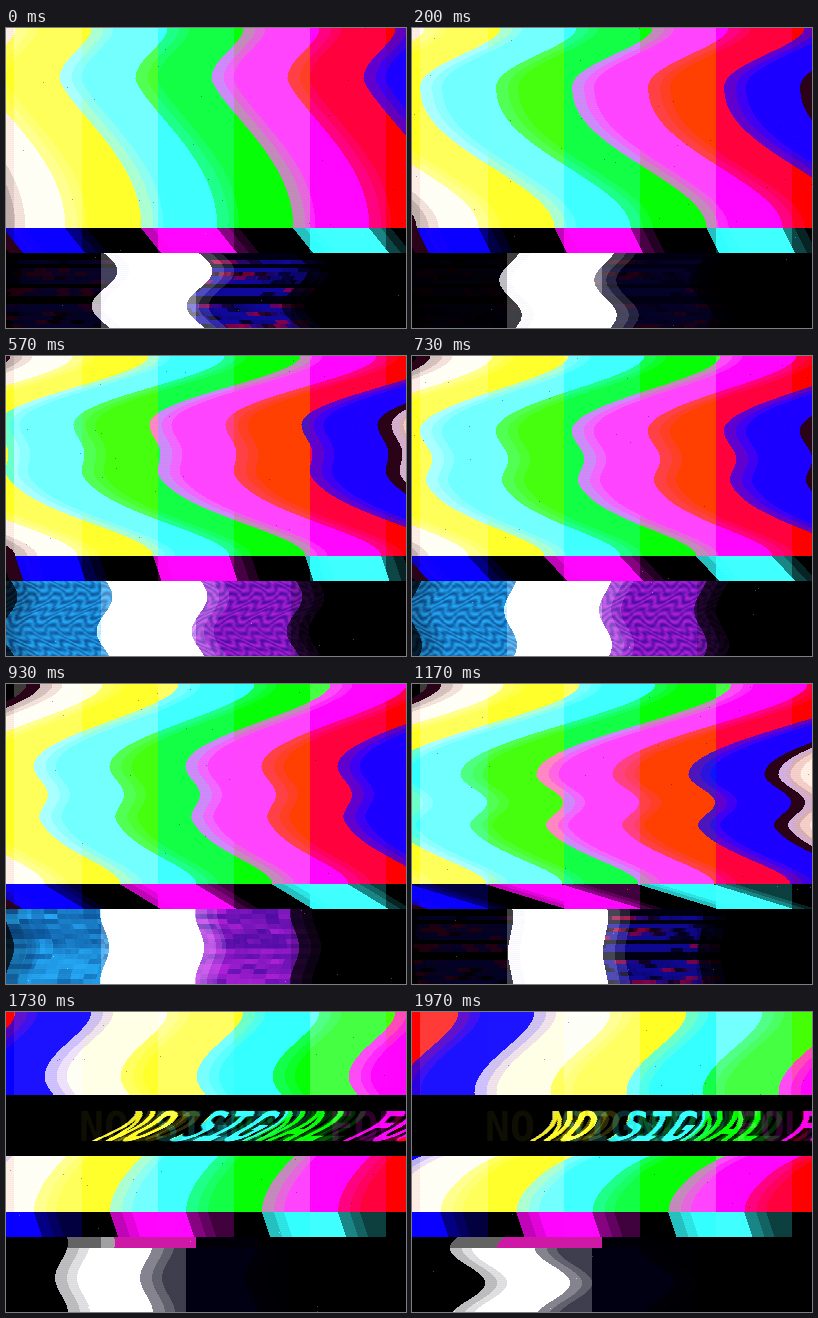
Write an HTML page with a canvas that moves like this. It is 400x300 px and loops after 2.01 s.

```html
<!DOCTYPE html>
<html lang="en">
<head>
<meta charset="utf-8">
<title>Test card</title>
<style>
  html, body { margin: 0; width: 100%; height: 100%; overflow: hidden; background: #000; }
  canvas { display: block; width: 100vw; height: 100vh; }
</style>
</head>
<body>
<canvas id="screen" width="400" height="300"></canvas>
<script>
const W = 400, H = 300, WRAP = 532, LOOP = 2010, STEPS = 60;
const CARD_ON = 40;
const ctx = document.getElementById('screen').getContext('2d');
const image = ctx.createImageData(W, H);
const px = image.data;

const BLACK = [0, 0, 0], DARK = [42, 3, 25], NAVY = [1, 0, 14], WHITE = [250, 250, 252],
  CREAM = [244, 231, 221], YELLOW = [255, 248, 35], CYAN = [50, 255, 255], GREEN = [5, 255, 5],
  MAGENTA = [255, 5, 245], RED = [255, 0, 0], BLUE = [8, 0, 250];
const BARS = [CREAM, YELLOW, CYAN, GREEN, MAGENTA, RED, BLUE];
const LOWER = [BLUE, BLACK, MAGENTA, BLACK, CYAN, BLACK, BLACK];

// The bend of the picture: shift at the top, furthest shift and its height,
// shift at the base, and the size of the kink below the furthest point.
const BENDS = [
  { at: 0, top: -67, peak: -99, y: 50, base: -17, kink: 0 },
  { at: 11, top: -62, peak: -182, y: 65, base: -4, kink: 0 },
  { at: 17, top: -10, peak: -161, y: 68, base: -5, kink: 10 },
  { at: 28, top: 20, peak: -125, y: 82, base: -38, kink: 14 },
  { at: 35, top: 15, peak: -180, y: 90, base: -78, kink: 26 },
  { at: 44, top: 42, peak: 11, y: 47, base: -49, kink: 42 },
  { at: 59, top: 122, peak: 62, y: 80, base: -48, kink: 20 }
];

const lerp = (a, b, p) => a + (b - a) * p;
const ease = p => (1 - Math.cos(Math.PI * p)) / 2;
const hash = (a, b, c) => {
  const v = Math.sin(a * 12.99 + b * 78.23 + c * 37.72) * 43758.55;
  return v - Math.floor(v);
};

let step = -1, card = false, lit = false, streak = 0;

function bendAt(s) {
  let k = 0;
  while (k < BENDS.length - 2 && BENDS[k + 1].at <= s) k++;
  const a = BENDS[k], b = BENDS[k + 1], p = (s - a.at) / (b.at - a.at);
  const bend = {};
  for (const key in a) bend[key] = lerp(a[key], b[key], p);
  return bend;
}

function shiftAt(bend, y) {
  const foot = card ? -40 : 3;
  if (y >= 225) {
    const sway = card ? (step - 48) * 1.6 : 13 - 0.3 * step;
    return foot + sway * Math.sin((y - 225 + 4.27 * step) * Math.PI / 35);
  }
  if (y >= 200) return lerp(bend.base, foot, (y - 200) / 25);
  if (y < bend.y) return lerp(bend.top, bend.peak, ease((y / bend.y) ** 0.9));
  const below = y - bend.y;
  const skew = card ? 1 : Math.min(2.2, 0.7 + 0.075 * step);
  const span = card ? 80 : 55;
  const kink = below < span ? bend.kink * ease(2 * below / span) : 0;
  return lerp(bend.peak, bend.base, ease((below / (200 - bend.y)) ** skew)) + kink;
}

function textMask() {
  const c = document.createElement('canvas');
  c.width = WRAP;
  c.height = H;
  const g = c.getContext('2d');
  g.font = 'bold 41.5px "DejaVu Sans Mono", monospace';
  g.fillText('NO SIGNAL FOUND', 73, 129);
  const data = g.getImageData(0, 0, WRAP, H).data;
  return (u, y) => data[(y * WRAP + u) * 4 + 3] / 255;
}
const mask = textMask();

// Blue and purple blocks: wavy lines first, torn cells later.
function texture(u, y, left) {
  let n = Math.sin(y * 0.8 + 4 * Math.sin(u * 0.25 + 2 * Math.sin(y * 0.1))) / 2 + 0.5;
  if (step >= 23) n = hash(Math.floor(u / 13), Math.floor(y / 5), step) ** (y < 264 ? 1.3 : 0.6);
  return left ? [10 + 20 * n, 65 + 70 * n, 120 + 75 * n] : [55 + 85 * n, 8 + 18 * n, 125 + 45 * n];
}

function streaks(u, y, left) {
  const row = Math.floor(y / 4);
  const h = hash(Math.floor((u + row * 7) / 12), row, 3);
  const k = streak * (left ? 0.25 : 1);
  if (hash(row, 1, 5) < 0.35 || h < 0.2) return left ? BLACK : NAVY;
  return h > 0.8 ? [150 * k, 0, 60 * k] : [15 * k, 8 * k, 150 * k];
}

function footer(u, y) {
  if (u >= 95 && u < (card ? 180 : 190)) return WHITE;
  if (u < 0 || u >= 285) return BLACK;
  const left = u < 95;
  if (lit) return texture(u, y, left);
  if (streak > 0) return streaks(u, y, left);
  return left ? BLACK : NAVY;
}

function sample(u, y, still) {
  if (y >= 225) return footer(u, y);
  if (still && u < 8) return BLACK;
  if (!still && !card) {
    if (u < 0) return BLACK;
    if (u % WRAP < 14) return DARK;
  }
  const bar = Math.floor(((u + WRAP) % WRAP) / 76);
  return (y < 200 ? BARS : LOWER)[bar];
}

const sum = [0, 0, 0];
function add(u, y, weight, still) {
  if (card && y >= 83 && y < 144) {
    weight *= mask((u + WRAP) % WRAP, y) * (still ? 0.7 : 1.25);
    if (!weight) return;
  }
  const c = sample(u, y, still);
  for (let i = 0; i < 3; i++) sum[i] += c[i] * weight;
}

function put(x, y, r, g, b) {
  const o = (y * W + x) * 4;
  px[o] = r;
  px[o + 1] = g;
  px[o + 2] = b;
  px[o + 3] = 255;
}

function draw() {
  card = step >= CARD_ON;
  lit = step >= 14 && step < 32;
  streak = step < 8 ? 0.8 * (1 - step / 8) : step >= 32 ? Math.max(0, 1 - (step - 32) / 12) : 0;
  const bend = bendAt(step);
  for (let y = 0; y < H; y++) {
    const d = shiftAt(bend, y);
    const tail = card && y >= 225 && y < 236;
    const line = y % 2 ? 0.98 : 1;
    for (let x = 0; x < W; x++) {
      const u = Math.floor(x - d);
      if (tail && u >= 142 && x < 190) {
        put(x, y, 205, 25, 165);
        continue;
      }
      const c = sample(u, y);
      if (c === DARK) {
        put(x, y, ...DARK);
        continue;
      }
      sum.fill(0);
      add(u, y, tail ? 0.4 : 0.76);
      if (!tail) {
        add(u - 12, y, 0.14);
        add(u - 22, y, 0.14);
      }
      const faint = y < 200 && (c === BLUE || c === CREAM);
      add(x, y, faint ? 0.08 : 0.25, true);
      put(x, y, sum[0] * line, sum[1] * line, sum[2] * line);
    }
  }
  // Sparse tape specks.
  for (let i = 0; i < 36; i++) {
    const x = Math.floor(hash(i, step, 1) * W), y = Math.floor(hash(i, step, 2) * H);
    const o = (y * W + x) * 4;
    for (let c = o; c < o + 3; c++) px[c] = y < 200 ? px[c] * 0.65 : px[c] + 70;
  }
  ctx.putImageData(image, 0, 0);
}

// Steps are a thirtieth of a second, rounded to 10 ms.
function stepAt(t) {
  let i = Math.min(STEPS - 1, Math.floor(t * 0.03) + 1);
  while (Math.round(i * 10 / 3) * 10 > t) i--;
  return i;
}

function tick() {
  const next = stepAt(performance.now() % LOOP);
  if (next !== step) {
    step = next;
    draw();
  }
  requestAnimationFrame(tick);
}
tick();
</script>
</body>
</html>
```
